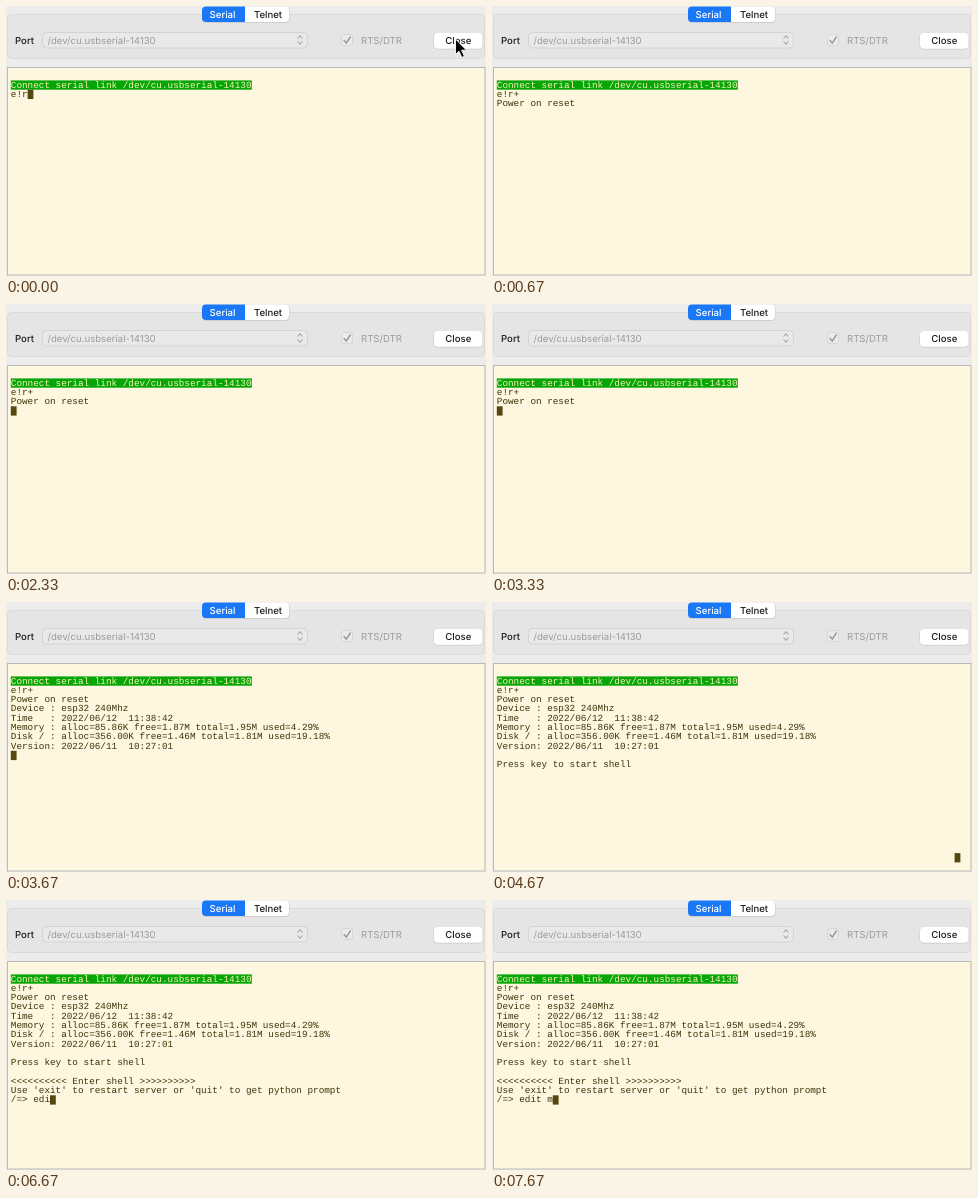
Animation, 480 px wide and 270 px high, one loop 8 s. Source, as an HTML page:

```html
<!DOCTYPE html>
<html lang="en">
<head>
<meta charset="utf-8">
<title>Serial terminal</title>
<style>
  html, body { margin: 0; width: 100%; height: 100%; overflow: hidden; background: #ececec; }
  svg { display: block; width: 480px; height: 270px; }
  text { font: 500 9.6px Inter, sans-serif; fill: #1c1c1c; text-rendering: geometricPrecision; }
  .off { font-weight: 400; fill: #9c9c9c; }
  #term text { font: 9.333px "Liberation Mono", monospace; fill: #3d3208; white-space: pre; }
  #term text.title { fill: #f4f4b4; }
</style>
</head>
<body>
<svg viewBox="0 0 480 270">
  <rect x="1.5" y="8.5" width="477" height="44" rx="4" fill="#e5e5e5" stroke="#dadada"/>

  <rect x="196" y=".8" width="87.5" height="16" rx="4" fill="#c8c8c8"/>
  <rect x="196.5" y=".5" width="86.5" height="15.5" rx="4" fill="#fff"/>
  <path d="M239 .5V16H200a4 4 0 0 1-4-4V4.500a4 4 0 0 1 4-4z" fill="#1a78f6"/>
  <text x="216.500" y="12" text-anchor="middle" style="fill:#fff">Serial</text>
  <text x="262" y="12" text-anchor="middle">Telnet</text>

  <text x="9" y="37.800">Port</text>
  <rect x="36.500" y="26.500" width="265" height="15.500" rx="4" fill="#e9e9e9" stroke="#d3d3d3"/>
  <text class="off" x="41.500" y="37.500">/dev/cu.usbserial-14130</text>
  <path d="M291.500 32.500l2.500-2.700 2.500 2.700M291.500 35.500l2.500 2.700 2.500-2.700" fill="none" stroke="#a6a6a6" stroke-width="1.100"/>

  <rect x="335.500" y="28.500" width="11" height="11" rx="2.500" fill="#ebebeb" stroke="#d6d6d6"/>
  <path d="M338 34.500l2.300 2.700 4-6.200" fill="none" stroke="#959595" stroke-width="1.400" stroke-linecap="round"/>
  <text class="off" x="355" y="37.800">RTS/DTR</text>

  <rect x="427.500" y="27" width="49.500" height="16.500" rx="4.500" fill="#cacaca"/>
  <rect x="428" y="27" width="48.500" height="15.700" rx="4" fill="#fff"/>
  <text x="452.300" y="38" text-anchor="middle">Close</text>

  <rect x="1.500" y="61.500" width="477.500" height="207.500" fill="#fef7e0" stroke="#b9b9b5"/>
  <rect x="4.800" y="74.400" width="241" height="9.300" fill="#08a508"/>
  <g id="term"></g>
  <rect id="caret" width="5.800" height="9.300" fill="#54480f"/>
  <path id="mouse" d="M449.500 33v15.500l3.500-3.300 2.800 6.300 2.600-1.200-2.800-6.100h4.900z" fill="#000" stroke="#fff" stroke-width=".9"/>
</svg>
<script>
const LOOP = 8000, LEFT = 4.8, TOP = 65.1, COL = 5.6, ROW = 9.3;
const $ = id => document.getElementById(id);

const hello = ["", "Connect serial link /dev/cu.usbserial-14130"];
const boot = [...hello, "e!r+", "Power on reset", ""];
const info = [...boot.slice(0, -1),
  "Device : esp32 240Mhz",
  "Time   : 2022/06/12  11:38:42",
  "Memory : alloc=85.86K free=1.87M total=1.95M used=4.29%",
  "Disk / : alloc=356.00K free=1.46M total=1.81M used=19.18%",
  "Version: 2022/06/11  10:27:01", ""];
const press = [...info, "Press key to start shell", ""];
const shell = [...press,
  "<<<<<<<<<< Enter shell >>>>>>>>>>",
  "Use 'exit' to restart server or 'quit' to get python prompt"];
const prompt = "/=> ", command = "edit m";
const keyTimes = [6000, 6330, 6670, 7000, 7330, 7670];

function linesAt(t) {
  if (t < 330) return [...hello, "e!r"];
  if (t < 670) return [...hello, "e!r+"];
  if (t < 3670) return boot;
  if (t < 4330) return info;
  if (t < 5000) return press;
  const typed = keyTimes.filter(k => t >= k).length;
  return [...shell, prompt + command.slice(0, typed)];
}

// The caret blinks while the device is silent.
const hidden = [[670, 1000], [1670, 2330], [2670, 3330], [4000, 4330]];

const rows = Array.from({ length: 15 }, (_, i) => {
  const row = document.createElementNS("http://www.w3.org/2000/svg", "text");
  row.setAttribute("x", LEFT);
  row.setAttribute("y", TOP + i * ROW + 7.1);
  if (i === 1) row.setAttribute("class", "title");
  return $("term").appendChild(row);
});

function draw(t) {
  const lines = linesAt(t);
  rows.forEach((row, i) => {
    const text = lines[i] || "";
    if (row.textContent !== text) row.textContent = text;
  });
  let line = lines.length - 1, col = lines[line].length;
  // The shell probes the screen size from the bottom right corner.
  if (t >= 4670 && t < 5000) [line, col] = [20, 81.75];
  $("caret").setAttribute("x", LEFT + col * COL);
  $("caret").setAttribute("y", TOP + line * ROW);
  $("caret").style.display = hidden.some(([a, b]) => t >= a && t < b) ? "none" : "";
  $("mouse").style.display = t < 330 ? "" : "none";
}

function tick() {
  draw(performance.now() % LOOP);
  requestAnimationFrame(tick);
}
tick();
</script>
</body>
</html>
```
